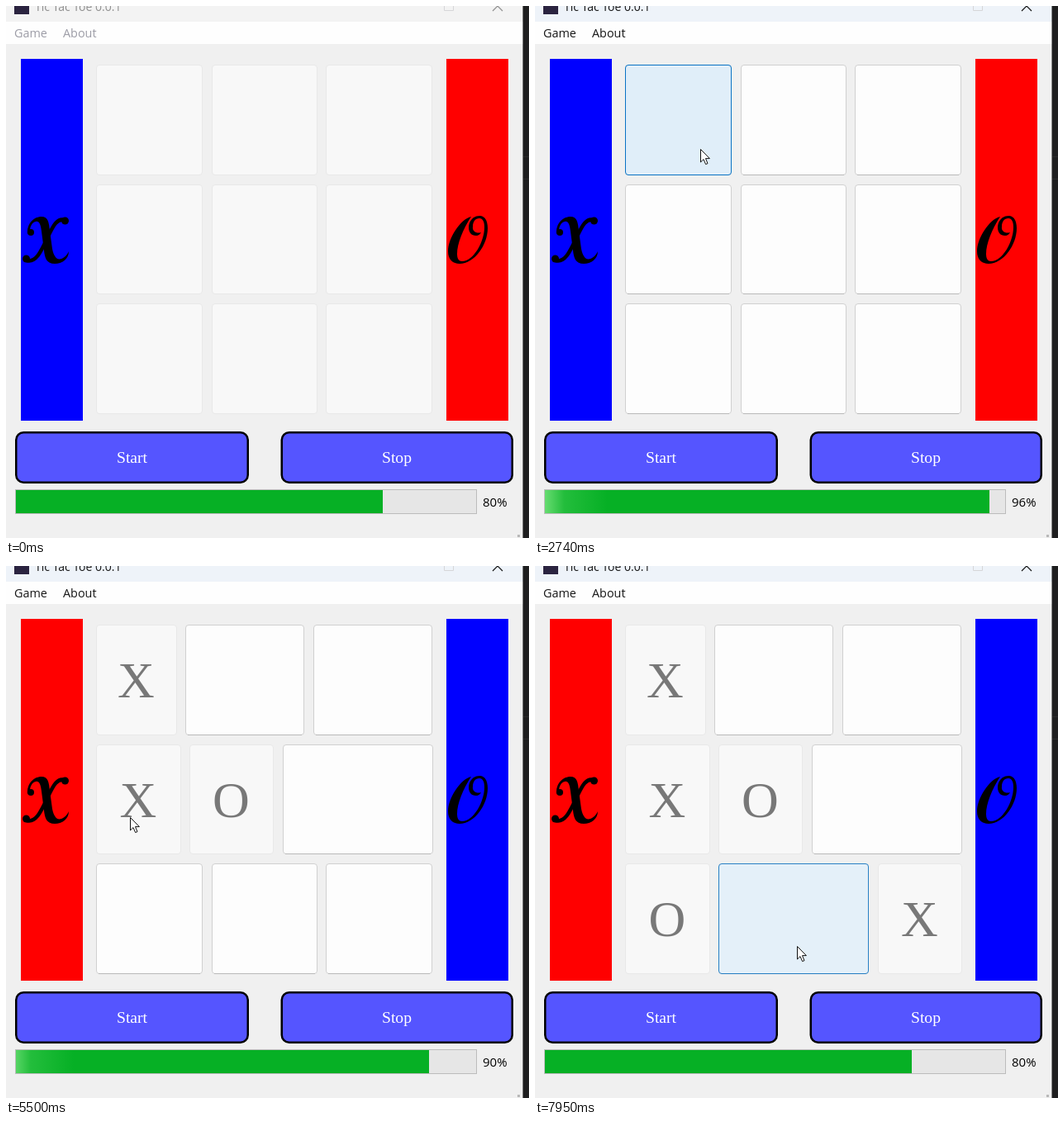
These frames come from a looping animation (633 px wide and 644 px high, 8 s). An HTML page:

```html
<!DOCTYPE html>
<html lang="en">
<head>
<meta charset="utf-8">
<title>Tic Tac Toe</title>
<style>
  html, body { margin: 0; width: 100%; height: 100%; overflow: hidden; background: #f0f0f0; }
  #stage { display: block; width: 633px; height: 644px; }
  .ui { font-family: "Open Sans", "Noto Sans", sans-serif; }
  .serif { font-family: "Liberation Serif", serif; text-anchor: middle; }
  .mark { font-size: 62px; fill: #787878; }
  .button rect { fill: #55f; stroke: #000; stroke-width: 2.5; }
  .button text { font-size: 19.6px; fill: #fff; }
  .button.hover rect { fill: #fff; }
  .button.hover text { fill: #3a1466; }
  .cell .face { fill: #f8f8f8; stroke: #e8e8e8; }
  .cell .edge { stroke: #b9b9b9; visibility: hidden; }
  .cell .glow { fill: #e0eef9; stroke: #0a73c4; opacity: 0; }
  .cell.open .face { fill: #fdfdfd; stroke: #d0d0d0; }
  .cell.open .edge { visibility: visible; }
  #titlebar { fill: #f3f3f3; }
  #caption { fill: #8f8f8f; }
  #menu { fill: #9c9ca6; }
  #close { stroke: #8f8f8f; }
  .active #titlebar { fill: #eef3f9; }
  .active #caption, .active #menu { fill: #151515; }
  .active #close { stroke: #151515; }
</style>
</head>
<body>
<svg id="stage" viewBox="0 0 633 644">
  <defs>
    <linearGradient id="shine">
      <stop offset="0" stop-color="#7ae580" stop-opacity="0"/>
      <stop offset=".3" stop-color="#7ae580" stop-opacity=".25"/>
      <stop offset=".45" stop-color="#7ae580" stop-opacity=".9"/>
      <stop offset=".55" stop-color="#7ae580" stop-opacity=".9"/>
      <stop offset=".7" stop-color="#7ae580" stop-opacity=".25"/>
      <stop offset="1" stop-color="#7ae580" stop-opacity="0"/>
    </linearGradient>
  </defs>

  <rect width="633" height="644" fill="#f0f0f0"/>
  <rect id="titlebar" width="626" height="19"/>
  <rect y="19" width="626" height="27" fill="#fefefe"/>
  <rect x="10" y="-8" width="18" height="18" fill="#2b2440"/>
  <text id="caption" class="ui" x="35" y="6" font-size="14">Tic Tac Toe 0.0.1</text>
  <path d="M530.5 0V5.5H541.5V0" fill="none" stroke="#d6d6d8"/>
  <path id="close" d="M589 6L601 -6M589 -6L601 6" stroke-width="1.2"/>
  <g id="menu" class="ui" font-size="14.4">
    <text x="10" y="38">Game</text>
    <text x="69" y="38">About</text>
  </g>
  <rect x="625.5" width="8" height="644" fill="#1e1e1f"/>
  <path d="M626 182.5H633M626 209.5H633" stroke="#2b2b2c"/>
  <rect x="619" y="640" width="3" height="3" fill="#b8b8b8"/>

  <rect id="panelX" x="18" y="64" width="75" height="438"/>
  <rect id="panelO" x="533" y="64" width="75" height="438"/>
  <g>
    <path d="M26 276C25 264 33 255 43 255C51 255 52 262 53 272L56 294C58 304 62 308 67 306C72 304 74 301 76 297C76 306 68 312 59 312C49 312 47 305 46 296L43 273C42 264 40 260 36 261C31 262 29 268 29 272Z"/>
    <path d="M73 260C62 254 56 268 50 281C42 298 36 311 25 308" fill="none" stroke="#000" stroke-width="4.5"/>
    <circle cx="71.5" cy="260" r="4.5"/><circle cx="24.5" cy="306" r="4.5"/><circle cx="30" cy="274" r="4"/>
    <path d="M563 255C550 258 535 281 535 297C535 307 541 312 549 312C567 312 583 289 583 269C583 259 579 254 573 254C565 254 560 261 560 268C560 274 563 278 569 278C572 278 574 276 575 274C570 276 564 273 565 267C565 261 568 257 573 257C577 257 579 261 579 268C579 285 566 309 552 309C548 309 546 306 546 300C546 288 553 270 563 255Z"/>
  </g>

  <g id="board"></g>

  <g id="start" class="button">
    <rect x="12.25" y="516.25" width="280.5" height="60.5" rx="9"/>
    <text class="serif" x="152.5" y="553">Start</text>
  </g>
  <g class="button">
    <rect x="333.75" y="516.25" width="279" height="60.5" rx="9"/>
    <text class="serif" x="473" y="553">Stop</text>
  </g>

  <rect x="11.5" y="585.5" width="558" height="29" fill="#e6e6e6" stroke="#bcbcbc"/>
  <svg id="bar" x="12" y="586" width="444" height="28">
    <rect width="558" height="28" fill="#06b025"/>
    <rect id="sweep" width="174" height="28" fill="url(#shine)"/>
  </svg>
  <text id="percent" class="ui" x="577" y="606" font-size="15">80%</text>

  <path id="cursor" d="M.5 .5V16L4 12.6 6.6 18.6 9 17.6 6.5 11.6H11.4Z" fill="#fff" stroke="#111" stroke-linejoin="round"/>
</svg>

<script>
const LOOP = 8000, ACTIVATE = 1020, START = 1480, TICK = 1020, FADE = 200;
const BLUE = '#0000ff', RED = '#ff0000';
const ROWS = [[71, 205], [216, 349], [360, 494]];
// Left and right edges of a row's cells, keyed by which are taken.
const EDGES = {
  '000': [109, 238, 249, 377, 387, 516],
  '100': [109, 207, 217, 361, 372, 516],
  '010': [109, 253, 264, 362, 372, 516],
  '110': [109, 212, 222, 324, 335, 517],
  '101': [109, 212, 222, 404, 415, 517]
};
const MOVES = [[3000, 0, 'X'], [4490, 4, 'O'], [5360, 3, 'X'], [6300, 6, 'O'], [7230, 8, 'X']];
const SWEEPS = [110, START + TICK - 40, 5238, 7940];
// Pointer stops: time, x, y.
const PATH = [
  [180, 495, 646], [790, 265, 559], [920, 262, 556], [1960, 262, 556],
  [2600, 204, 185], [2740, 200, 173], [2880, 188, 160], [3080, 188, 160],
  [3510, 248, 206], [3650, 250, 208], [4400, 298, 270], [4570, 298, 270],
  [5200, 148, 295], [5400, 148, 295], [6030, 171, 430], [6380, 171, 431],
  [7060, 434, 452], [7700, 434, 452], [7950, 317, 460]
];

const $ = id => document.getElementById(id);
const set = (el, attrs) => { for (const k in attrs) el.setAttribute(k, attrs[k]); };
function add(parent, tag, attrs) {
  const el = document.createElementNS('http://www.w3.org/2000/svg', tag);
  set(el, attrs);
  return parent.appendChild(el);
}

const cells = Array.from({ length: 9 }, () => {
  const g = add($('board'), 'g', { class: 'cell' });
  return {
    g,
    face: add(g, 'rect', { class: 'face', rx: 3.5 }),
    edge: add(g, 'path', { class: 'edge' }),
    glow: add(g, 'rect', { class: 'glow', rx: 3.5 }),
    text: add(g, 'text', { class: 'serif mark' })
  };
});

function pointer(t) {
  const i = PATH.findIndex(p => p[0] > t);
  if (i < 0) return PATH[PATH.length - 1].slice(1);
  if (i === 0) return [-100, -100];
  const [t0, x0, y0] = PATH[i - 1], [t1, x1, y1] = PATH[i];
  const u = (t - t0) / (t1 - t0), s = u * u * (3 - 2 * u);
  return [x0 + (x1 - x0) * s, y0 + (y1 - y0) * s];
}

function marksAt(t) {
  const marks = Array(9).fill('');
  for (const [at, i, m] of MOVES) if (t >= at) marks[i] = m;
  return marks;
}

function boxOf(i, marks) {
  const r = Math.floor(i / 3), c = i % 3;
  const key = marks.slice(r * 3, r * 3 + 3).map(m => m ? 1 : 0).join('');
  const e = EDGES[key];
  return [e[c * 2], ROWS[r][0], e[c * 2 + 1], ROWS[r][1]];
}

const inside = ([x, y], [l, t, r, b]) => x >= l && x < r && y >= t && y < b;

// Share of the last FADE ms the pointer spent over each cell.
function hoverLevels(t) {
  const levels = Array(9).fill(0), n = 20;
  for (let k = 0; k < n; k++) {
    const s = t - k * FADE / n;
    if (s < START) break;
    const p = pointer(s), marks = marksAt(s);
    levels.forEach((_, i) => { if (inside(p, boxOf(i, marks))) levels[i] += 1 / n; });
  }
  return levels;
}

function drawBoard(t) {
  const marks = marksAt(t), levels = hoverLevels(t);
  cells.forEach((cell, i) => {
    const [l, top, r, b] = boxOf(i, marks), open = t >= START && !marks[i];
    const box = { x: l + .5, y: top + .5, width: r - l - 1, height: b - top - 1 };
    cell.g.classList.toggle('open', open);
    set(cell.face, box);
    set(cell.glow, box);
    set(cell.edge, { d: `M${l + 3} ${b - .5}H${r - 3}` });
    cell.glow.style.opacity = open ? levels[i] : 0;
    set(cell.text, { x: (l + r) / 2 - .5, y: top + 88 });
    cell.text.textContent = marks[i];
  });
  const turnX = marks.filter(Boolean).length % 2 === 0;
  set($('panelX'), { fill: turnX ? BLUE : RED });
  set($('panelO'), { fill: turnX ? RED : BLUE });
}

function drawBar(t) {
  const left = t < START ? 24 : 30 - Math.floor((t - START) / TICK);
  set($('bar'), { width: Math.round(444 + 18.75 * (left - 24)) });
  $('percent').textContent = Math.floor(left * 100 / 30) + '%';
  const begin = SWEEPS.filter(s => s <= t).pop();
  const shown = begin !== undefined && left < 30;
  set($('sweep'), { x: shown ? -186 + .312 * (t - begin) : -200 });
}

function draw(now) {
  const t = now % LOOP, p = pointer(t);
  $('stage').classList.toggle('active', t >= ACTIVATE);
  $('start').classList.toggle('hover', inside(p, [11, 515, 294, 578]));
  set($('cursor'), { transform: `translate(${Math.round(p[0])} ${Math.round(p[1])})` });
  drawBoard(t);
  drawBar(t);
}

const origin = performance.now();
function loop() {
  draw(performance.now() - origin);
  requestAnimationFrame(loop);
}
loop();
</script>
</body>
</html>
```
